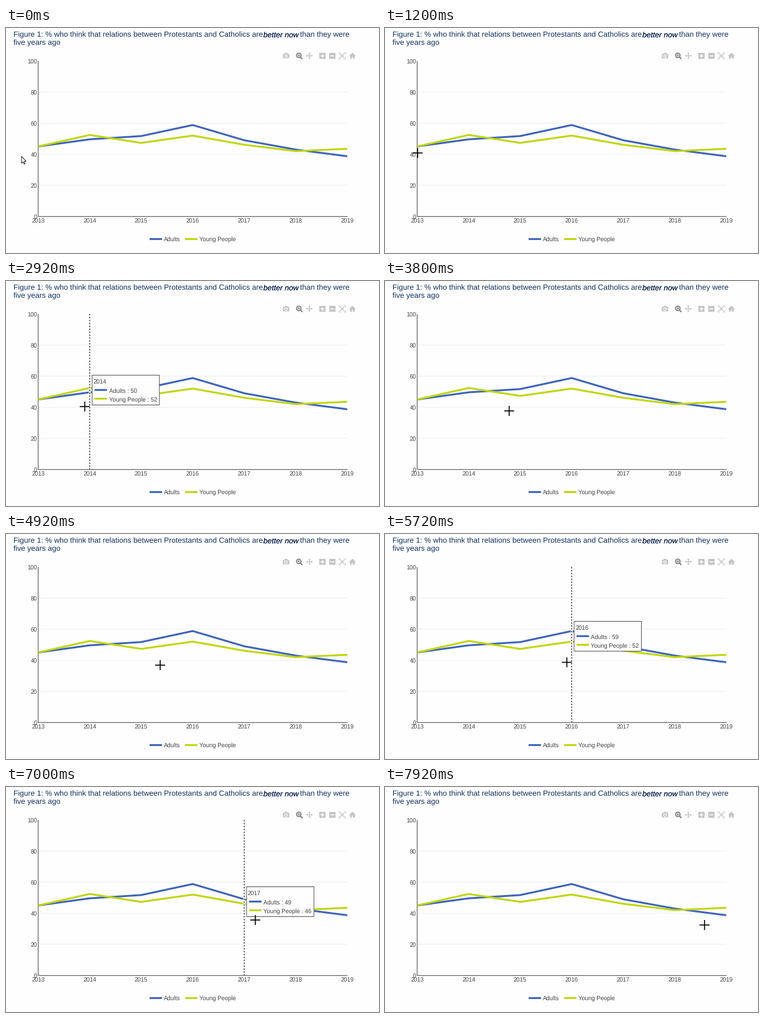
These frames come from a looping animation (600x362 px, 8000 ms). A matplotlib script:

```python
import numpy as np
import matplotlib.pyplot as plt
from matplotlib.animation import FuncAnimation
from matplotlib.patches import Circle, FancyBboxPatch, Polygon, Rectangle

W, H = 600, 362
STEP_MS, LOOP_MS = 40, 8000
BLUE, LIME = "#3f64b8", "#bfd60b"
INK, NAVY, GREY, PAPER = "#444444", "#12305f", "#c3c4c6", "#fefefe"

plt.rcParams.update({
    "font.family": "Liberation Sans",
    "text.hinting": "none",
    "path.snap": False,
    "toolbar": "None",
})

# 72 dpi makes one point equal to one pixel
fig = plt.figure(figsize=(W / 72, H / 72), dpi=72, facecolor=PAPER)
ax = fig.add_axes([0, 0, 1, 1])
ax.set_xlim(0, W)
ax.set_ylim(H, 0)
ax.axis("off")

LEFT, RIGHT, TOP, BASE = 51.8, 548.9, 53.1, 303.1
years = np.arange(2013, 2020)
year_x = np.linspace(LEFT, RIGHT, len(years))
adults = np.array([45, 49.6, 51.7, 58.8, 49, 43, 38.7])
young = np.array([45, 52.4, 47.3, 52, 46.1, 42, 43.5])


def to_y(value):
    return BASE - np.asarray(value) * (BASE - TOP) / 100


def line(xs, ys, color, width, z=2, **kw):
    kw.setdefault("solid_capstyle", "butt")
    return ax.plot(xs, ys, color=color, lw=width, zorder=z, **kw)[0]


def label(x, y, s, size=9.5, color=INK, z=5, **kw):
    return ax.text(x, y, s, fontsize=size, color=color, zorder=z,
                   va="baseline", **kw)


def shape(points, color=GREY, z=6, **kw):
    kw.setdefault("lw", 0)
    return ax.add_patch(Polygon(points, closed=True, fc=color, zorder=z, **kw))


def box(x, y, w, h, color=GREY, z=6):
    return ax.add_patch(Rectangle((x, y), w, h, fc=color, lw=0, zorder=z))


def disc(x, y, r, color, z=7):
    return ax.add_patch(Circle((x, y), r, fc=color, lw=0, zorder=z))


def draw_title():
    label(12, 15, "Figure 1: % who think that relations between "
          "Protestants and Catholics are", 12.1, NAVY)
    for dx in (0, 0.35):
        label(413.5 + dx, 15, "better now", 12.1, "#0c2450", style="italic")
    label(473, 15, "than they were", 12.1, NAVY)
    label(12, 28, "five years ago", 12.1, NAVY)


def draw_chart():
    for v in range(0, 101, 20):
        y = to_y(v)
        if 0 < v < 100:
            line([LEFT, RIGHT], [y, y], "#eeeeee", 1, 1)
        label(50, y + 4.7, str(v), ha="right")
    for x, year in zip(year_x, years):
        label(x, 314.2, str(year), ha="center")
    line([LEFT, RIGHT + 0.5], [BASE + 0.2] * 2, INK, 1, 2)
    line([LEFT, LEFT], [TOP, BASE], INK, 1, 2)
    for data, color in ((adults, BLUE), (young, LIME)):
        line(year_x, to_y(data), color, 3, 3, solid_joinstyle="round")
    for x, name, color in ((231, "Adults", BLUE), (288, "Young People", LIME)):
        line([x, x + 20], [339.6, 339.6], color, 3)
        label(x + 23.2, 343.3, name)


def draw_tools():
    # camera
    ax.add_patch(FancyBboxPatch((446, 42.2), 9, 6, fc=GREY, lw=0, zorder=6,
                                boxstyle="round,pad=0.6,rounding_size=1"))
    box(448.2, 40, 4.6, 2)
    disc(450.5, 45.2, 2.7, PAPER)
    disc(450.5, 45.2, 1.5, GREY, 8)
    # zoom
    dark = "#7b7c7f"
    ax.add_patch(Circle((471, 44), 3.6, fc="none", ec=dark, lw=1.7, zorder=6))
    line([473.5, 476.8], [46.6, 49.8], dark, 2, 6)
    line([469, 473], [44, 44], dark, 1.1, 6)
    line([471, 471], [42, 46], dark, 1.1, 6)
    # pan
    cx, cy = 488, 44.7
    line([cx - 4, cx + 4], [cy, cy], GREY, 1.3, 6)
    line([cx, cx], [cy - 4, cy + 4], GREY, 1.3, 6)
    for dx, dy in ((1, 0), (-1, 0), (0, 1), (0, -1)):
        bx, by = cx + 3 * dx, cy + 3 * dy
        shape([(cx + 5.5 * dx, cy + 5.5 * dy),
               (bx + 2 * dy, by + 2 * dx), (bx - 2 * dy, by - 2 * dx)])
    # zoom in and out
    for x in (509, 525):
        box(x - 5, 40, 10, 9.6)
        box(x - 3, 44, 6, 1.6, PAPER, 7)
    box(508.2, 41.8, 1.6, 6, PAPER, 7)
    # autoscale
    cx, cy = 541, 44.8
    for sx in (-1, 1):
        for sy in (-1, 1):
            line([cx + sx * 2.6, cx + sx * 5.2, cx + sx * 5.2],
                 [cy + sy * 5, cy + sy * 5, cy + sy * 2.6], GREY, 1, 6)
            line([cx, cx + sx * 3.4], [cy, cy + sy * 3.4], GREY, 1.4, 6)
    # home
    shape([(551.7, 45), (557.3, 39.8), (562.8, 45)])
    box(553.4, 44.6, 3, 4.8)
    box(558, 44.6, 3, 4.8)
    box(553.4, 44.4, 7.6, 2)


class Tooltip:
    WIDTH, HEIGHT, GAP = 108.3, 48, 3.8

    def __init__(self):
        self.halo = line([0, 0], [TOP, BASE], PAPER, 3.2, 10)
        self.spike = line([0, 0], [TOP, BASE], "#222222", 1.3, 11,
                          dashes=(1.8, 1.8), dash_capstyle="butt")
        self.frame = ax.add_patch(Rectangle(
            (0, 0), self.WIDTH, self.HEIGHT, fc=PAPER, ec="#555555", lw=1,
            zorder=12))
        self.year = label(0, 0, "", z=13)
        self.keys = [line([0, 0], [0, 0], c, 3, 13) for c in (BLUE, LIME)]
        self.rows = [label(0, 0, "", z=13) for _ in self.keys]
        self.parts = [self.halo, self.spike, self.frame, self.year,
                      *self.keys, *self.rows]

    def show(self, i):
        for part in self.parts:
            part.set_visible(i is not None)
        if i is None:
            return
        x = year_x[i]
        left = x + self.GAP
        if left + self.WIDTH > 565:
            left = x - self.GAP - self.WIDTH
        top = to_y((adults[i] + young[i]) / 2) - self.HEIGHT / 2
        top = np.floor(top) + 0.5
        self.halo.set_xdata([x, x])
        self.spike.set_xdata([x, x])
        self.frame.set_xy((left, top))
        self.year.set_position((left + 2, top + 14.4))
        self.year.set_text(str(years[i]))
        pairs = (("Adults", adults[i]), ("Young People", young[i]))
        for n, (name, value) in enumerate(pairs):
            y = top + 23.8 + 14 * n
            self.keys[n].set_data([left + 4, left + 24], [y, y])
            self.rows[n].set_position((left + 27.3, y + 4.4))
            self.rows[n].set_text(f"{name} : {value:.0f}")


# pointer path: seconds, x, y
path = np.array([
    (0.3, 25, 206.5), (0.9, 42, 204), (1.5, 62, 198), (2.2, 72, 195),
    (3.0, 135, 203), (3.8, 199.7, 209), (4.9, 248, 211), (5.7, 292.5, 206.5),
    (7.0, 401, 214), (7.9, 514, 222),
])
key_t, key_p = path[:, 0], path[:, 1:]
key_v = np.gradient(key_p, key_t, axis=0)
key_v[0] = 0


def pointer(t):
    """Smooth cubic path through the key points."""
    t = np.clip(t, key_t[0], key_t[-1])
    i = min(np.searchsorted(key_t, t, side="right") - 1, len(key_t) - 2)
    span = key_t[i + 1] - key_t[i]
    u = (t - key_t[i]) / span
    return ((1 + 2 * u) * (1 - u) ** 2 * key_p[i]
            + u * (1 - u) ** 2 * span * key_v[i]
            + u * u * (3 - 2 * u) * key_p[i + 1]
            + u * u * (u - 1) * span * key_v[i + 1])


def hovered(x):
    if x < LEFT:
        return None
    gap = np.abs(year_x - x)
    i = int(gap.argmin())
    return i if gap[i] <= 20 else None


draw_title()
draw_chart()
draw_tools()
tip = Tooltip()
ARROW = np.array([(0, 0), (0, 11), (2.5, 8.8), (4.2, 12.6), (5.9, 11.8),
                  (4.2, 8.2), (7.4, 8)])
arrow = shape(ARROW, "white", 20, ec="#222222", lw=1)
cross = [line([0, 0], [0, 0], "black", 1.6, 20) for _ in range(2)]


def update(frame):
    # the pointer advances ten times a second
    ms = frame * STEP_MS
    tick = 2 * (ms // 200) + (ms % 200 >= 120)
    if ms < 400:
        tick = 0
    x, y = pointer(tick / 10)
    inside = x >= LEFT
    arrow.set_visible(not inside)
    arrow.set_xy(ARROW + (x, y))
    cross[0].set_data([x - 8, x + 8], [y, y])
    cross[1].set_data([x, x], [y - 8, y + 8])
    for bar in cross:
        bar.set_visible(inside)
    # the hover box trails the pointer by one tick
    tip.show(hovered(pointer((tick - 1) / 10)[0]))
    return [arrow, *cross, *tip.parts]


anim = FuncAnimation(fig, update, frames=LOOP_MS // STEP_MS, interval=STEP_MS,
                     init_func=lambda: update(0), repeat=True, blit=False)
plt.show()
```
